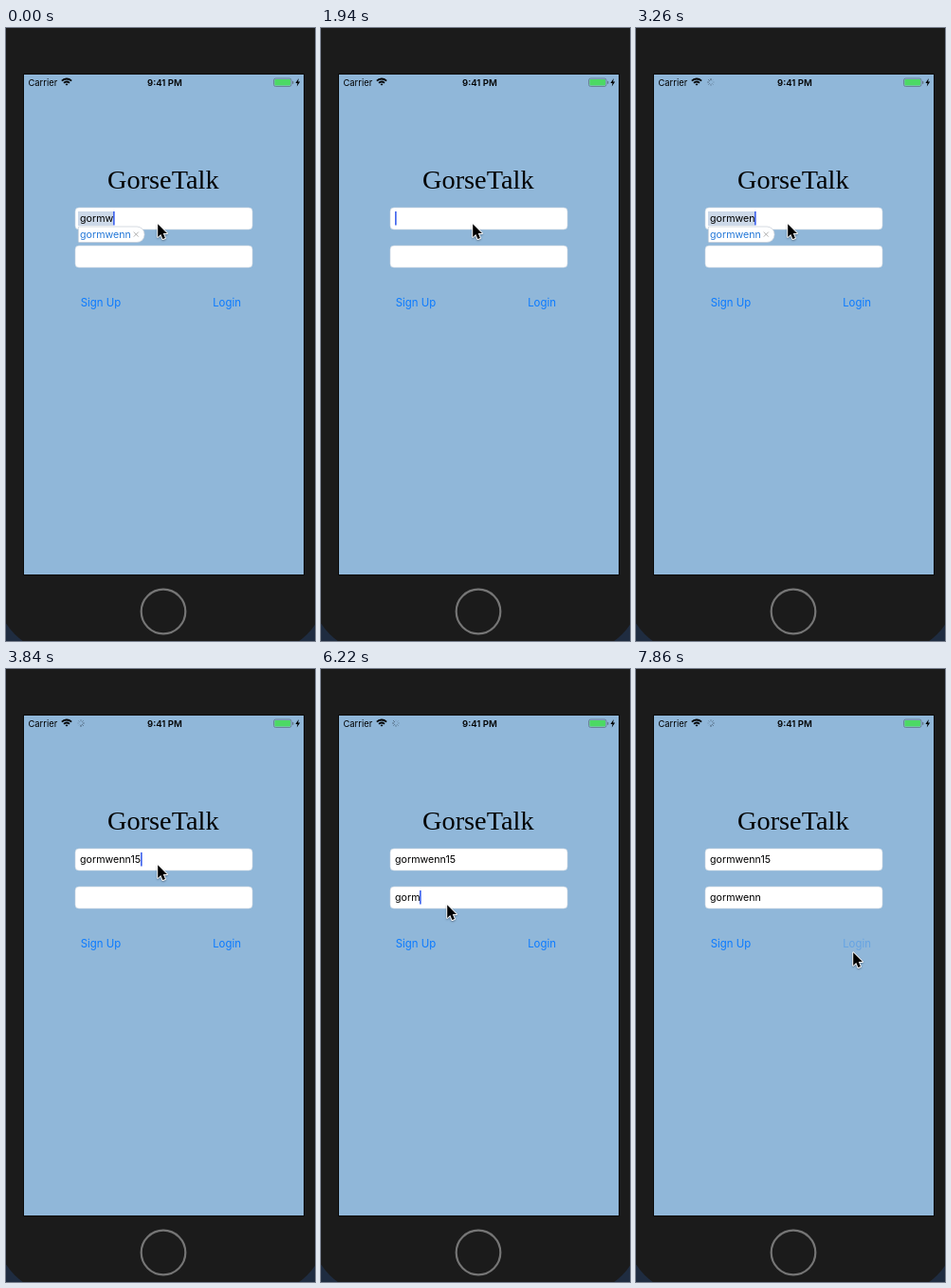
These frames come from a looping animation (326 by 645 pixels, 8000 ms). An HTML page with a canvas:

```html
<!DOCTYPE html>
<html lang="en">
<head>
<meta charset="utf-8">
<title>Login screen</title>
<style>
  html, body { margin: 0; width: 100%; height: 100%; overflow: hidden; background: #1b1b1b; }
  canvas { display: block; width: 326px; height: 645px; }
</style>
</head>
<body>
<canvas id="stage"></canvas>
<script>
const LOOP = 8000, W = 326, H = 645;
const KEY = 146;                      // ms between key presses
const FOCUS_AT = 4890, PRESS_AT = 7860;
const NAME = 'gormwenn';
const UI = 'Inter, "Open Sans", sans-serif';
const BLUE = '#0a7aff';

const canvas = document.getElementById('stage');
const ctx = canvas.getContext('2d');
const dpr = window.devicePixelRatio || 1;
canvas.width = W * dpr;
canvas.height = H * dpr;

const clamp = (v, lo, hi) => Math.min(hi, Math.max(lo, v));
const pressed = (t, start, count) => clamp(Math.floor((t - start) / KEY) + 1, 0, count);

// Key presses so far in each burst, and when the last of them happened
function typing(t) {
  const bursts = { erase: [150, 5], user: [2384, 10], passStart: [5480, 2], passEnd: [6070, 6] };
  const done = {};
  let lastKey = t >= FOCUS_AT ? FOCUS_AT : 0;
  for (const [name, [start, count]] of Object.entries(bursts)) {
    done[name] = pressed(t, start, count);
    if (done[name]) lastKey = Math.max(lastKey, start + (done[name] - 1) * KEY);
  }
  return {
    user: done.user || 5 - done.erase,
    pass: done.passStart + done.passEnd,
    idle: t - lastKey
  };
}

function box(x, y, w, h, radius, fill, stroke) {
  ctx.beginPath();
  ctx.roundRect(x, y, w, h, radius);
  if (fill) { ctx.fillStyle = fill; ctx.fill(); }
  if (stroke) { ctx.strokeStyle = stroke; ctx.stroke(); }
}

function label(str, x, y, font, color = '#000', align = 'left') {
  ctx.font = font;
  ctx.fillStyle = color;
  ctx.textAlign = align;
  ctx.fillText(str, x, y);
}

function arc(x, y, r, from, to, width, color) {
  ctx.beginPath();
  ctx.arc(x, y, r, from * Math.PI, to * Math.PI);
  ctx.lineWidth = width;
  ctx.strokeStyle = color;
  ctx.stroke();
}

function phone() {
  ctx.fillStyle = '#1f2c40';
  ctx.fillRect(0, 0, W, H);
  box(-9, -100, 345, 756, 62, '#1b1b1b');
  ctx.fillStyle = '#0c0c0c';
  ctx.fillRect(18, 48, 297, 528);
  ctx.fillStyle = '#90b7d9';
  ctx.fillRect(19, 49, 295, 526);
  arc(166, 614, 23.3, 0, 2, 2.2, '#757575');
}

function spinner(t) {
  // Shown for 750 ms of each request cycle
  if ((t + 858) % 1008 >= 750) return;
  const head = Math.floor((t % 1000) / 125);
  ctx.lineWidth = 0.9;
  for (let i = 0; i < 8; i++) {
    const angle = (head - i) * Math.PI / 4 + Math.PI;
    const c = Math.cos(angle), s = Math.sin(angle);
    ctx.strokeStyle = `rgba(50, 65, 80, ${0.9 - i * 0.11})`;
    ctx.beginPath();
    ctx.moveTo(79 + 1.8 * c, 57 + 1.8 * s);
    ctx.lineTo(79 + 3.8 * c, 57 + 3.8 * s);
    ctx.stroke();
  }
}

function statusBar(t) {
  label('Carrier', 23.5, 60.5, `9.4px ${UI}`);
  label('9:41 PM', 167.4, 60.5, `600 9.6px ${UI}`, '#000', 'center');
  for (const r of [1, 4, 7]) arc(64, 60.5, r, -0.76, -0.24, 1.8, '#000');
  spinner(t);

  ctx.lineWidth = 0.8;
  box(282.5, 53, 18.5, 8.5, 2, null, '#63788a');
  box(283.4, 53.9, 16.7, 6.7, 1, '#4cd964');
  box(302, 55.8, 1.3, 3, 0.6, '#63788a');
  ctx.fillStyle = '#000';
  ctx.fill(new Path2D('M308.8 53L305.4 58H307.5L306.8 61.5L310.2 56.5H308.1Z'));
}

function field(y, str, hasCaret, suggesting) {
  ctx.lineWidth = 0.6;
  box(73, y, 187, 23, 4, '#fff', '#ccd6e0');
  const font = `10.7px ${UI}`;
  ctx.font = font;
  const end = Math.round(77.5 + ctx.measureText(str).width);
  if (suggesting) {
    ctx.fillStyle = '#cdd9e9';
    ctx.fillRect(76, y + 4, end - 76, 15);
  }
  label(str, 78, y + 15, font);
  if (hasCaret) {
    ctx.fillStyle = '#4568ee';
    ctx.fillRect(end, y + 4, 1.7, 14.5);
  }
}

function suggestion(y) {
  ctx.lineWidth = 0.7;
  box(76.3, y + 20, 69.8, 16.5, [1, 8, 8, 1], '#fff', '#c3cbd4');
  label(NAME, 78, y + 32, `10.7px ${UI}`, '#2478d8');
  ctx.strokeStyle = '#a9a9a9';
  ctx.lineWidth = 0.9;
  ctx.stroke(new Path2D(`M134.8 ${y + 25.6}l5 5m0 -5l-5 5`));
}

function pointer(t) {
  // Moves in four eased steps: first field, second field, login button
  const glide = start => {
    const k = pressed(t, start, 4) / 4;
    return k * k * (3 - 2 * k);
  };
  const a = glide(4290), b = glide(7260);
  const arrow = new Path2D('M0 0V14.6L3.3 11.5L5.6 17L8.3 15.9L6 10.5H10.5Z');
  ctx.save();
  ctx.translate(160.2 - 27 * a + 96 * b, 206.3 + 42 * a + 50 * b);
  ctx.scale(0.93, 0.93);
  ctx.lineJoin = 'round';
  ctx.shadowColor = 'rgba(0, 0, 0, 0.35)';
  ctx.shadowBlur = 2 * dpr;
  ctx.shadowOffsetY = dpr;
  ctx.strokeStyle = '#fff';
  ctx.lineWidth = 2;
  ctx.stroke(arrow);
  ctx.shadowColor = 'transparent';
  ctx.fillStyle = '#000';
  ctx.fill(arrow);
  ctx.restore();
}

function form(t) {
  const typed = typing(t);
  const active = t < FOCUS_AT ? 0 : 1;
  const caret = t < PRESS_AT && typed.idle % 1000 < 600;
  const texts = [(NAME + '15').slice(0, typed.user), NAME.slice(0, typed.pass)];
  const length = texts[active].length;
  const suggesting = length > 4 && length < NAME.length;

  texts.forEach((str, i) =>
    field(189 + 40 * i, str, caret && i === active, suggesting && i === active));
  if (suggesting) suggestion(189 + 40 * active);

  const button = `11.4px ${UI}`;
  label('Sign Up', 100, 293, button, BLUE, 'center');
  label('Login', 233, 293, button, t >= PRESS_AT ? '#65a3e3' : BLUE, 'center');
}

function draw(t) {
  ctx.setTransform(dpr, 0, 0, dpr, 0, 0);
  phone();
  statusBar(t);
  label('GorseTalk', 165.8, 169, '28.3px "Liberation Serif", serif', '#000', 'center');
  form(t);
  pointer(t);
}

const began = performance.now();
function tick() {
  draw((performance.now() - began) % LOOP);
  requestAnimationFrame(tick);
}
tick();
</script>
</body>
</html>
```
